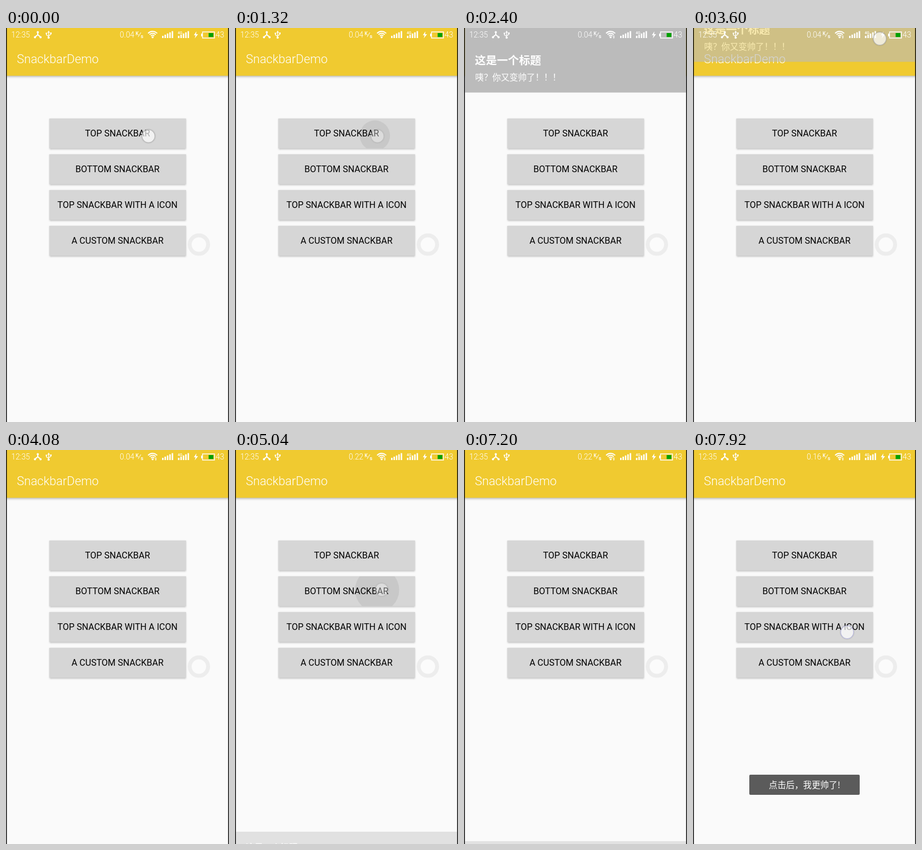
These frames come from a looping animation (400 by 705 pixels, 8 s). An HTML page with a canvas:

```html
<!DOCTYPE html>
<html lang="zh-CN">
<head>
<meta charset="utf-8">
<title>Snackbar demo</title>
<style>
html, body { margin: 0; width: 100%; height: 100%; overflow: hidden; background: #fafafa; }
canvas { display: block; }
</style>
</head>
<body>
<canvas id="stage" width="400" height="705"></canvas>
<script>
const stage = document.getElementById('stage').getContext('2d');
const layer = stage.canvas.cloneNode().getContext('2d');
let ctx = stage;

const LOOP = 8000, STEP = 120;
const LATIN = 'Roboto, "Noto Sans CJK SC", sans-serif';
const CJK = '"Noto Sans CJK SC", "Noto Sans CJK", sans-serif';
const LABELS = ['TOP SNACKBAR', 'BOTTOM SNACKBAR', 'TOP SNACKBAR WITH A ICON', 'A CUSTOM SNACKBAR'];
const HEADING = '这是一个标题';

const ramp = (t, from, to) => Math.min(1, Math.max(0, (t - from) / (to - from)));
const ease = x => 1 - (1 - x ** 1.5) ** 3.5;
const mix = (a, b, p) => a + (b - a) * p;

function rect(x, y, w, h, color) {
  ctx.fillStyle = color;
  ctx.fillRect(x, y, w, h);
}

function text(str, x, y, size, { color = '#fff', weight = 300, family = LATIN, align = 'left' } = {}) {
  ctx.font = `${weight} ${size}px ${family}`;
  ctx.textAlign = align;
  ctx.fillStyle = color;
  ctx.fillText(str, x, y);
}

function circle(x, y, r, fill, stroke, width = 1) {
  ctx.beginPath();
  ctx.arc(x, y, r, 0, 7);
  if (fill) { ctx.fillStyle = fill; ctx.fill(); }
  if (stroke) { ctx.strokeStyle = stroke; ctx.lineWidth = width; ctx.stroke(); }
}

function path(d, { fill, stroke, width = 1.5 } = {}) {
  const p = new Path2D(d);
  if (fill) { ctx.fillStyle = fill; ctx.fill(p); }
  if (stroke) { ctx.strokeStyle = stroke; ctx.lineWidth = width; ctx.stroke(p); }
}

// Draws a group on its own layer, so that its parts fade as one.
function withAlpha(alpha, draw) {
  if (alpha <= 0) return;
  layer.clearRect(0, 0, 400, 705);
  ctx = layer;
  ctx.save();
  draw();
  ctx.restore();
  ctx = stage;
  ctx.globalAlpha = alpha;
  ctx.drawImage(layer.canvas, 0, 0);
  ctx.globalAlpha = 1;
}

function withShadow(color, blur, dy, draw) {
  ctx.save();
  ctx.shadowColor = color;
  ctx.shadowBlur = blur;
  ctx.shadowOffsetY = dy;
  draw();
  ctx.restore();
}

function button(label, i, ripple) {
  const y = 162 + 64 * i;
  withShadow('rgba(0,0,0,.25)', 3, 1, () => rect(77.5, y, 245.5, 53.5, '#d6d6d6'));
  if (ripple.row === i) {
    withAlpha(ripple.alpha, () => {
      ctx.beginPath();
      ctx.rect(77.5, y, 245.5, 53.5);
      ctx.clip();
      circle(ripple.x, ripple.y, ripple.r, '#c8c8c8');
    });
  }
  text(label, 200, y + 31.5, 16, { color: '#000', weight: 400, align: 'center' });
}

// A growing press circle that drifts towards the button's centre, then fades.
function rippleAt(t) {
  const make = (row, x, y, start, fade) => {
    const p = ramp(t, start, start + 1400);
    return {
      row, r: 10 + 185 * p, x: mix(x, 200, p * .8), y: mix(y, 188 + 64 * row, p),
      alpha: p > 0 ? 1 - ramp(t, fade, fade + 420) : 0
    };
  };
  return t < 3000 ? make(0, 255, 193, 1190, 1740) : make(1, 263, 250, 4816, 5280);
}

function signal(x) {
  for (let i = 0; i < 5; i++) {
    const h = 4 + 2.1 * i;
    rect(x + 4.3 * i, 18 - h, 2.6, h, '#fff');
  }
}

function statusBar(t) {
  const white = { stroke: '#fff' };
  text('12:35', 9.5, 17, 13.8);
  path('M57 7V12L51 17M57 12L63 17', { ...white, width: 2 });
  [[57, 7.5], [52, 16.5], [62, 16.5]].forEach(([x, y]) => circle(x, y, 1.9, '#fff'));

  path('M76.5 7V18M76.5 15L72.5 12.5V9.5M76.5 14L80.5 11.5V9', { ...white, width: 1.3 });
  path('M74.3 8.5L76.5 4.5L78.7 8.5Z', { fill: '#fff' });
  circle(76.5, 17.2, 1.9, '#fff');
  circle(72.5, 9.6, 1.4, '#fff');
  rect(79.2, 8, 2.6, 2.6, '#fff');

  const rate = t < 4200 ? '0.04' : t < 7560 ? '0.22' : '0.16';
  text(rate, 204, 17, 13.8);
  text('K', 232.5, 12.5, 8.5, { weight: 500 });
  text('s', 241.5, 18, 9.5, { weight: 500 });
  path('M237 16L242 8', { ...white, width: 1 });

  [11, 7.5, 4].forEach(r => {
    ctx.beginPath();
    ctx.arc(263, 17, r, -2.4, -.74);
    ctx.strokeStyle = '#fff';
    ctx.lineWidth = 1.9;
    ctx.stroke();
  });
  circle(263, 16.6, 1.8, '#fff');
  if (t >= 1920) path('M267 15.5L268.7 13L270.4 15.5ZM267 16.5L268.7 19L270.4 16.5Z', { fill: '#fff' });

  signal(280);
  signal(308.5);
  text('4G', 308, 10.5, 6.5, { weight: 500 });
  path('M341.5 6L337 13H340L338.5 18.5L344.5 11H341Z', { fill: '#fff' });
  ctx.strokeStyle = '#fff';
  ctx.lineWidth = 1.4;
  ctx.strokeRect(352.5, 7, 21.5, 11);
  rect(350, 10, 2, 5, '#fff');
  rect(363.5, 9, 8.5, 7.2, '#00a000');
  text('43', 376, 17, 13.8);
}

function topBar(t) {
  const shown = ease(ramp(t, 1430, 1910));
  let up = 115 * (1 - shown), alpha = shown;
  if (t >= 3000) {
    up = 55 * ramp(t, 3360, 3600) + 60 * ramp(t, 3600, 3960);
    alpha = up < 115 ? 1 - .8 * up / 115 : 0;
  }
  withAlpha(alpha, () => {
    rect(1.5, -up, 397, 115.5, '#bbb');
    text(HEADING, 19.5, 64.5 - up, 19.8, { weight: 700, family: CJK });
    text('咦？你又变帅了！！！', 20, 94 - up, 15.4, { family: CJK });
  });
}

function bottomBar(t) {
  const shown = ease(ramp(t, 4915, 5395)), leave = ramp(t, 6900, 7380);
  const down = 56 * (1 - shown + ease(leave));
  withAlpha(shown * (1 - leave), () => {
    rect(1.5, 649 + down, 397, 56, '#bbb');
    text(HEADING, 19.5, 683 + down, 15.4, { weight: 700, family: CJK });
    text('点击一下', 328, 683 + down, 13.3, { color: '#f44336', weight: 500, family: CJK });
  });
}

function toast(t) {
  withAlpha(ramp(t, 7320, 7680), () => {
    ctx.fillStyle = '#5b5b5b';
    ctx.beginPath();
    ctx.roundRect(101, 581, 198, 36, 2);
    ctx.fill();
    text('点击后，我更帅了!', 136, 604.5, 15.4, { family: CJK, weight: 400 });
  });
}

function finger(t, from, to, x, y, rim = '#b4b4b4') {
  if (t < from || t >= to) return;
  withAlpha(1 - .7 * ramp(t, to - 240, to - 60), () => {
    circle(x, y, 12.5, null, 'rgba(0,0,0,.06)', 2);
    circle(x, y, 11.5, 'rgba(255,255,255,.68)', rim, 1.1);
  });
}

function render(t) {
  rect(0, 0, 400, 705, '#fafafa');
  withShadow('rgba(0,0,0,.3)', 4, 1, () => rect(0, 0, 400, 85.5, '#f0ca30'));
  text('SnackbarDemo', 19.5, 63, 21.8);
  const ripple = rippleAt(t);
  LABELS.forEach((label, i) => button(label, i, ripple));
  topBar(t);
  bottomBar(t);
  statusBar(t);
  circle(346, 387.5, 16.5, '#fbfbfb', '#ededed', 7);
  toast(t);

  finger(t, 0, 1440, 255.5, 193.5);
  finger(t, 3000, 3840, 335, mix(74, 19, ramp(t, 3360, 3600)));
  finger(t, 4320, 5160, 263, 250);
  finger(t, 6720, 7080, 358.5, 679, '#9c9cc4');
  finger(t, 7560, 8400, 276.5, 326, '#b4b4dc');

  rect(0, 0, 1.5, 705, '#111');
  rect(398.5, 0, 1.5, 705, '#111');
}

const start = performance.now();
function tick() {
  const t = (performance.now() - start) % LOOP;
  render(Math.floor(t / STEP) * STEP);
  requestAnimationFrame(tick);
}
tick();
</script>
</body>
</html>
```
